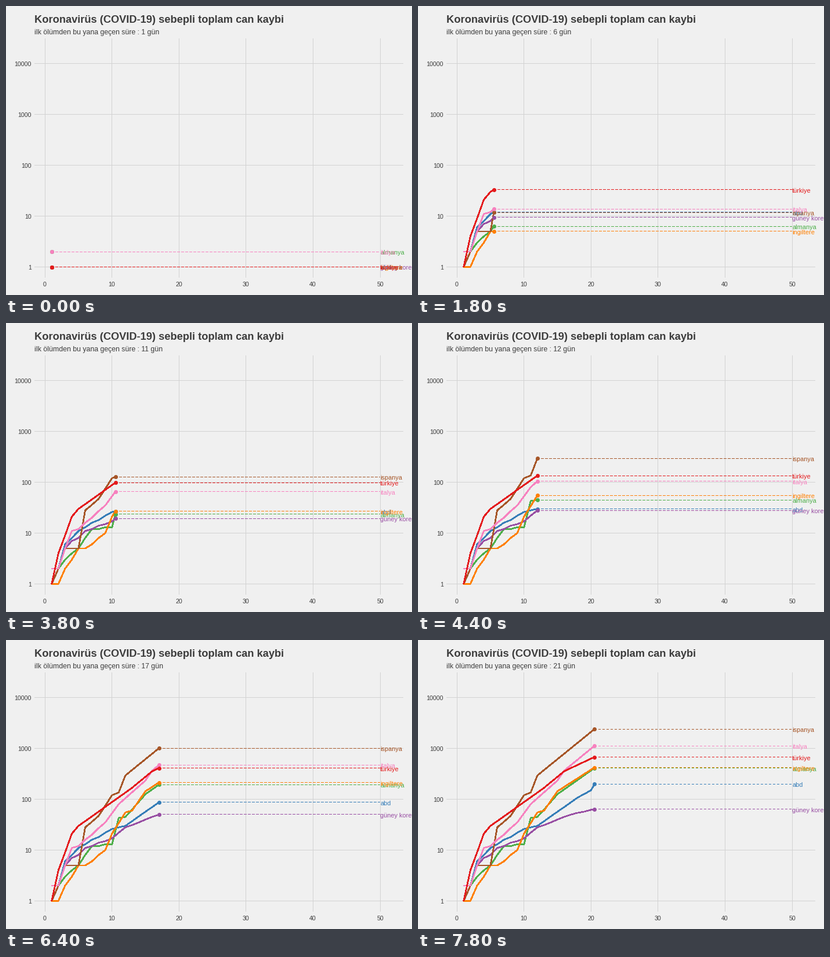
Animation, 700 px wide and 500 px high, one loop 8000 ms. Source, as a matplotlib script:

```python
import math

import matplotlib.pyplot as plt
import numpy as np
from matplotlib.animation import FuncAnimation

W, H, DPI = 700, 500, 100
PT = 72 / DPI  # points per pixel
INK, PAPER, GRID = "#3c3c3c", "#f0f0f0", "#d2d2d2"
FRAMES, INTERVAL, STEP = 40, 200, 0.5
DAYS = np.arange(1, 22)

# country: colour, {day: deaths} at the turning points of each curve
CURVES = {
    "abd": ("#377eb8", {1: 1, 3: 6, 5: 11, 10: 26, 12: 30, 18: 108, 20: 150, 21: 260}),
    "almanya": ("#4daf4a", {1: 2, 2: 2, 5: 5, 7: 12, 10: 13, 11: 43, 12: 45,
                            15: 126, 21: 455}),
    "güney kore": ("#984ea3", {1: 1, 3: 5, 6: 11, 10: 17, 12: 28, 17: 50, 21: 66}),
    "ingiltere": ("#ff7f00", {1: 1, 2: 1, 5: 5, 7: 6, 9: 10, 10: 21, 12: 55,
                              13: 60, 15: 144, 21: 463}),
    "ispanya": ("#a65628", {1: 1, 3: 5, 5: 5, 6: 28, 8: 47, 10: 120, 11: 136,
                            12: 294, 21: 2696}),
    "italya": ("#f781bf", {1: 2, 2: 2, 4: 11, 5: 12, 9: 35, 11: 80, 15: 234,
                           16: 366, 21: 1266}),
    "türkiye": ("#e41a1c", {1: 1, 2: 4, 4: 21, 5: 30, 13: 168, 16: 356, 21: 725}),
}

plt.rcParams["font.family"] = "Liberation Sans"


def px_x(day):
    return 67.2 + 11.556 * day


def px_y(log_count):
    return 451.5 - 88 * log_count


def mid(v):
    """Centre of the pixel that holds v."""
    return math.floor(v) + 0.5


def daily_logs(keys):
    """Exponential growth between turning points, in whole deaths per day."""
    logs = np.interp(DAYS, list(keys), np.log10(list(keys.values())))
    return np.log10(np.rint(10 ** logs))


fig = plt.figure(figsize=(W / DPI, H / DPI), dpi=DPI, facecolor=PAPER)
ax = fig.add_axes([0, 0, 1, 1])
ax.set_xlim(0, W)
ax.set_ylim(H, 0)
ax.axis("off")


def label(x, y, text, size, color=INK, **kw):
    return ax.text(x, y, text, fontsize=size * PT, color=color, va="baseline", **kw)


def line(xs, ys, color, width, z, **kw):
    return ax.plot(xs, ys, color=color, lw=width * PT, zorder=z, snap=False,
                   antialiased=False, solid_capstyle="butt", **kw)[0]


for power in range(5):
    y = mid(px_y(power))
    line([49, 685], [y, y], GRID, 1, 1)
    label(44, y + 4.5, str(10 ** power), 10.6, ha="right")
for day in range(0, 51, 10):
    x = mid(px_x(day))
    line([x, x], [56, 470], GRID, 1, 1)
    label(x - 0.5, 484.7, str(day), 10.6, ha="center")

label(49, 29, "Koronavirüs (COVID-19) sebepli toplam can kaybi", 18.25, weight="bold")
subtitle = label(49, 49, "", 12.3)


class Track:
    def __init__(self, name, color, keys, order):
        self.logs = daily_logs(keys)
        z = order / 10
        self.dash = line([], [], color, 1, 2 + z, dash_capstyle="butt")
        self.dash.set_linestyle((0, (4, 4)))
        self.path = line([], [], color, 1.7, 3 + z)
        self.dot = ax.plot([], [], "o", color=color, ms=7 * PT, mew=0,
                           zorder=4 + z, snap=False)[0]
        self.text = label(px_x(50), 0, name, 11, color, zorder=5 + z)

    def show(self, day):
        past = DAYS < day
        x = px_x(day)
        y = px_y(np.interp(day, DAYS, self.logs))
        self.path.set_data(np.append(px_x(DAYS[past]), x),
                           np.append(px_y(self.logs[past]), y))
        self.dot.set_data([x], [y])
        self.dash.set_data([x, px_x(50)], [mid(y), mid(y)])
        self.text.set_y(y + 5)


tracks = [Track(name, color, keys, i)
          for i, (name, (color, keys)) in enumerate(CURVES.items())]


def draw(frame):
    day = 1 + STEP * frame
    subtitle.set_text(f"ilk ölümden bu yana geçen süre : {math.ceil(day)} gün")
    for track in tracks:
        track.show(day)
    return []


anim = FuncAnimation(fig, draw, frames=FRAMES, interval=INTERVAL,
                     init_func=lambda: draw(0), repeat=True, repeat_delay=0)
plt.show()
```
